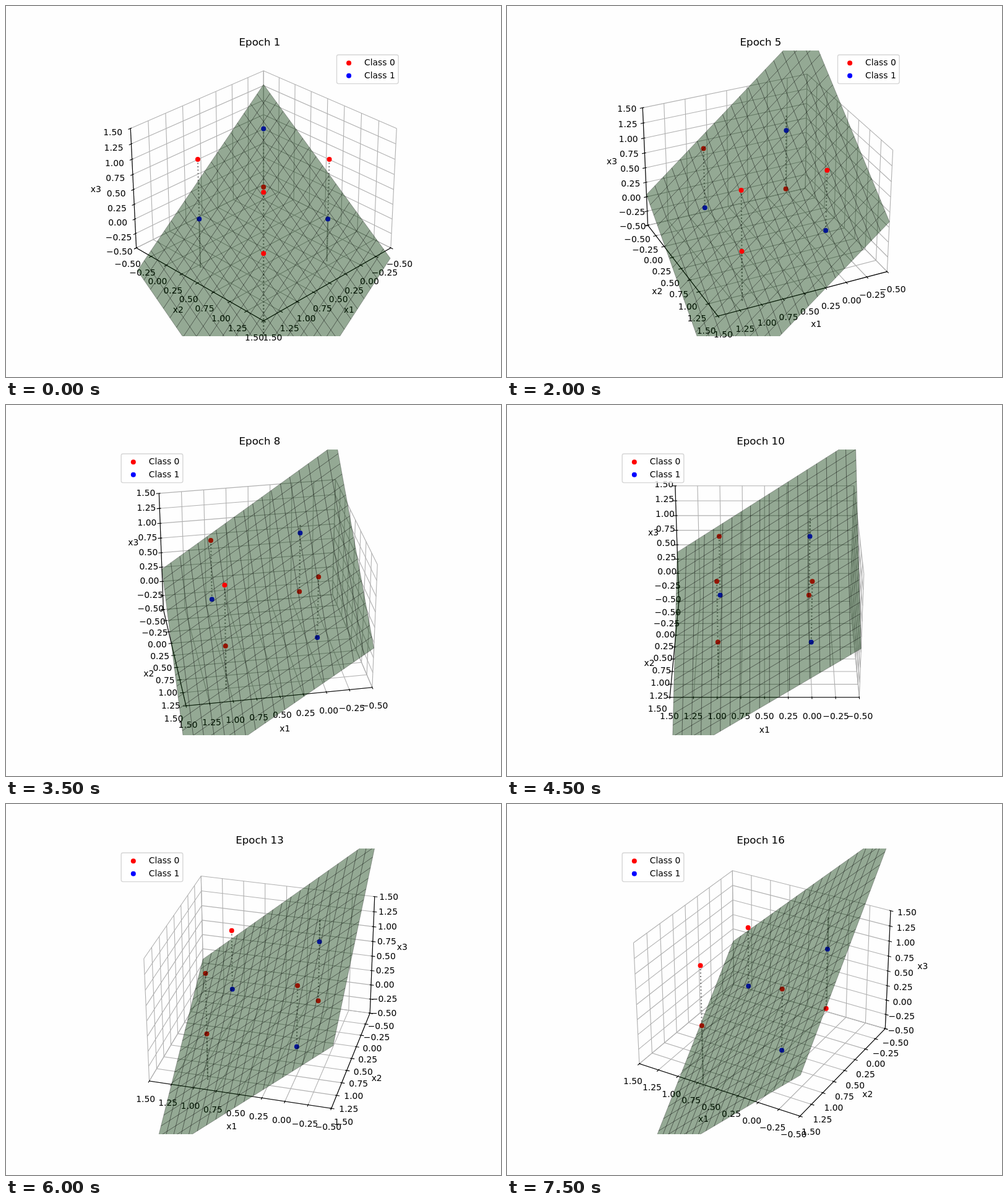
An HTML page with a canvas for the animation above (8000 ms loop, 800 px wide and 600 px high).

```html
<!DOCTYPE html>
<html lang="en">
<head>
<meta charset="utf-8">
<title>Separating plane</title>
<style>
  html, body { margin: 0; width: 100%; height: 100%; overflow: hidden; background: #fefefe; }
  canvas { display: block; }
</style>
</head>
<body>
<canvas id="stage" width="800" height="600"></canvas>
<script>
const ctx = document.getElementById('stage').getContext('2d');
const STEP = 500, EPOCHS = 16;
const LO = -0.5, HI = 1.5, MID = 0.5;
const PT = 100 / 72;
const BOX = { x: 179, y: 72, size: 462 };
const FONT = '"DejaVu Sans", Verdana, sans-serif';
const TICKS = Array.from({ length: 9 }, (_, i) => LO + i * 0.25);
const CELLS = 19;

// Plane height at corners (HI,LO), (LO,HI) and (LO,LO), keyed by epoch.
const PLANE = [
  [1, -0.902, -0.683, 1.268],
  [3, -0.257, -0.006, 1.948],
  [5, 0.039, 0.343, 2.316],
  [7, 0.137, 0.085, 2.015],
  [10, 0.372, 0.310, 2.263],
  [13, 0.066, 0.529, 2.471],
  [16, 0.280, 0.178, 2.825]
];

// Corners of the unit cube; class 1 has exactly one coordinate set.
const POINTS = Array.from({ length: 8 }, (_, i) => {
  const p = [i & 1, i >> 1 & 1, i >> 2];
  return { p, color: p[0] + p[1] + p[2] === 1 ? '#00f' : '#f00' };
});

function planeAt(epoch) {
  const k = Math.max(1, PLANE.findIndex(row => row[0] >= epoch));
  const from = PLANE[k - 1], to = PLANE[k];
  const f = (epoch - from[0]) / (to[0] - from[0]);
  const [, a, b, c] = from.map((v, i) => v + (to[i] - v) * f);
  return (x, y) => c + (a - c) * (x - LO) / 2 + (b - c) * (y - LO) / 2;
}

function camera(azimuth) {
  const a = azimuth * Math.PI / 180, ca = Math.cos(a), sa = Math.sin(a);
  const ce = Math.cos(Math.PI / 6), se = 0.5;
  const scale = BOX.size / 0.185;
  return ([x, y, z]) => {
    const X = (x - MID) * 25 / 42, Y = (y - MID) * 25 / 42, Z = (z - MID) * 25 / 56;
    const near = X * ca + Y * sa;
    const depth = 10 - near * ce - Z * se;
    return {
      x: BOX.x + (0.095 + (Y * ca - X * sa) / depth) * scale,
      y: BOX.y + BOX.size - (0.095 + (Z * ce - near * se) / depth) * scale,
      depth
    };
  };
}

function trace(points) {
  ctx.beginPath();
  points.forEach(p => ctx.lineTo(p.x, p.y));
}

function line(points, color, width) {
  trace(points);
  ctx.strokeStyle = color;
  ctx.lineWidth = width;
  ctx.stroke();
}

function text(str, x, y, size = 10, align = 'center') {
  ctx.font = `${size * PT}px ${FONT}`;
  ctx.textAlign = align;
  ctx.fillStyle = '#000';
  ctx.fillText(str, x, y);
}

function dot(x, y, color) {
  ctx.beginPath();
  ctx.arc(x, y, 4, 0, 7);
  ctx.fillStyle = color;
  ctx.fill();
}

function drawGrid(cam, back, front) {
  const grid = pts => line(pts.map(cam), '#b0b0b0', 0.8 * PT);
  for (const t of TICKS) {
    grid([[t, HI, LO], [t, LO, LO], [t, LO, HI]]);
    grid([[front, t, LO], [back, t, LO], [back, t, HI]]);
    grid([[back, HI, t], [back, LO, t], [front, LO, t]]);
  }
}

// edge: a point on the axis; along: its own index; dir: index its ticks follow.
function drawAxis(cam, name, edge, along, dir) {
  const at = v => edge.map((e, i) => i === along ? v : e);
  const pushed = (v, by) => at(v).map((e, i) => i === along ? e : e + Math.sign(e - MID) * by);
  const shifted = (v, by) => at(v).map((e, i) => i === dir ? e + Math.sign(e - MID) * by : e);

  line([at(LO), at(HI)].map(cam), '#000', 0.8 * PT);
  const mid = cam(pushed(MID, 0.2886));
  text(name, mid.x, mid.y + 4);
  for (const t of TICKS) {
    line([shifted(t, -0.016), shifted(t, 0.032)].map(cam), '#000', 0.8 * PT);
    const p = cam(pushed(t, 0.1328));
    text(t.toFixed(2).replace('-', '\u2212'), p.x, p.y + 11);
  }
}

function drawDrops(cam, height) {
  ctx.setLineDash([1.5 * PT, 2.475 * PT]);
  for (const { p } of POINTS) {
    line([p, [p[0], p[1], height(p[0], p[1])]].map(cam), '#808080', 1.5 * PT);
  }
  ctx.setLineDash([]);
}

function drawSurface(cam, height) {
  const at = (x, y) => cam([x, y, height(x, y)]);
  const corners = [at(LO, LO), at(HI, LO), at(HI, HI), at(LO, HI)];
  trace(corners);
  ctx.closePath();
  ctx.fillStyle = 'rgba(0, 50, 0, 0.42)';
  ctx.fill();
  for (let i = 0; i <= CELLS; i++) {
    const v = LO + 2 * i / CELLS;
    const ink = `rgba(0, 0, 0, ${i % CELLS ? 0.66 : 0.42})`;
    line([at(v, LO), at(v, HI)], ink, 0.5 * PT);
    line([at(LO, v), at(HI, v)], ink, 0.5 * PT);
  }
  return corners;
}

function drawLegend(left) {
  ctx.beginPath();
  ctx.roundRect(left, 79, 99.6, 46.6, 2.8);
  ctx.fillStyle = 'rgba(255, 255, 255, 0.8)';
  ctx.fill();
  ctx.strokeStyle = 'rgba(204, 204, 204, 0.8)';
  ctx.lineWidth = PT;
  ctx.stroke();
  ['#f00', '#00f'].forEach((color, i) => {
    dot(left + 19.6, 92.3 + 20.5 * i, color);
    text('Class ' + i, left + 44.5, 96 + 20.5 * i, 10, 'left');
  });
}

function draw(epoch) {
  const azimuth = 40 + 5 * epoch;
  const cam = camera(azimuth);
  const height = planeAt(epoch);
  const [back, front] = azimuth > 90 ? [HI, LO] : [LO, HI];

  ctx.fillStyle = '#fefefe';
  ctx.fillRect(0, 0, 800, 600);
  drawGrid(cam, back, front);
  drawAxis(cam, 'x1', [MID, HI, LO], 0, 1);
  drawAxis(cam, 'x2', [front, MID, LO], 1, 0);
  drawAxis(cam, 'x3', [front, LO, MID], 2, 0);

  ctx.save();
  ctx.beginPath();
  ctx.rect(BOX.x, BOX.y, BOX.size, BOX.size);
  ctx.clip();
  drawDrops(cam, height);

  // The surface is sorted as a whole, by its nearest corner.
  const corner = (x, y) => cam([x, y, height(x, y)]).depth;
  const nearest = Math.min(corner(LO, LO), corner(LO, HI), corner(HI, LO), corner(HI, HI));
  const dots = POINTS.map(({ p, color }) => ({ ...cam(p), color }))
    .sort((a, b) => b.depth - a.depth);
  const show = list => list.forEach(d => dot(d.x, d.y, d.color));
  show(dots.filter(d => d.depth >= nearest));
  drawSurface(cam, height);
  show(dots.filter(d => d.depth < nearest));
  ctx.restore();

  drawLegend(epoch < 8 ? 534.5 : 186.2);
  text('Epoch ' + epoch, 410, 64, 12);
}

const start = performance.now();
function tick() {
  const t = Math.max(0, performance.now() - start);
  draw(Math.floor(t / STEP) % EPOCHS + 1);
  requestAnimationFrame(tick);
}
tick();
</script>
</body>
</html>
```
